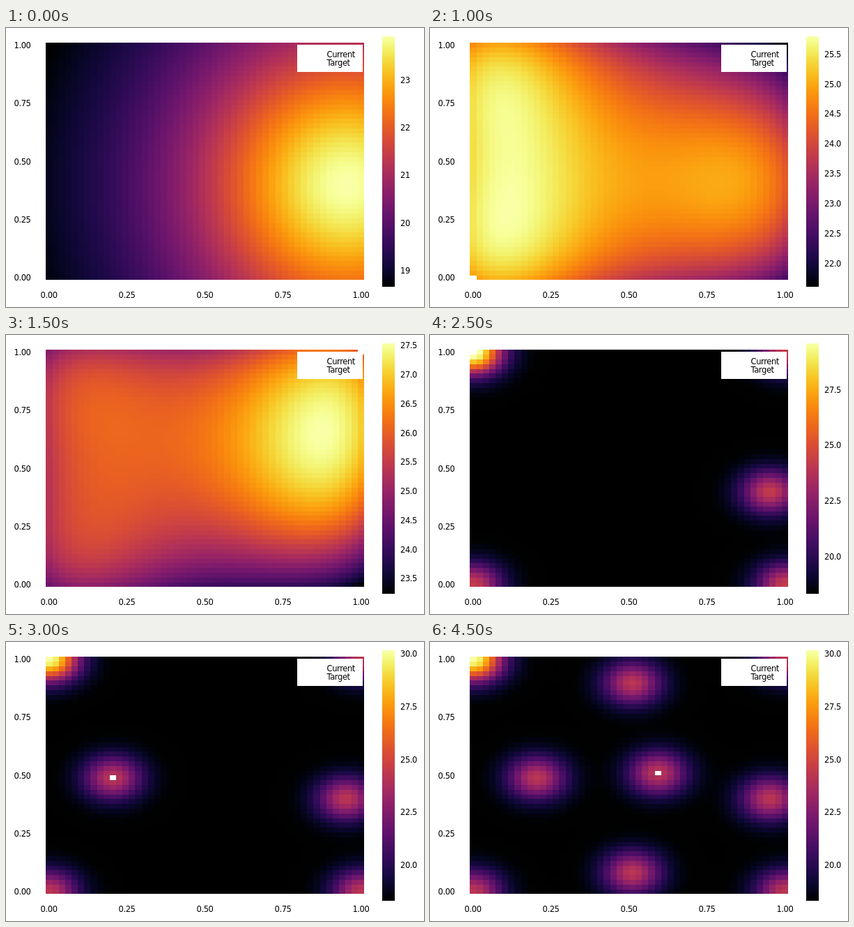
These frames come from a looping animation (600 px wide and 400 px high, 5 s). An HTML page with a canvas:

```html
<!DOCTYPE html>
<html lang="en">
<head>
<meta charset="utf-8">
<style>
  html, body { margin: 0; width: 100%; height: 100%; overflow: hidden; background: #fff; }
  canvas { display: block; }
</style>
</head>
<body>
<canvas id="stage" width="600" height="400"></canvas>
<script>
const ctx = document.getElementById('stage').getContext('2d');
const N = 50, LAST = N - 1, STEP_MS = 500;
const plot = { x: 57, y: 21, w: 457, h: 340 };
const bar = { x: 540, y: 12, w: 18, h: 359 };

// Polynomial fit of the inferno colour map, lowest power first.
const INFERNO = [
  [0.0002, 0.1065, 11.6025, -41.7040, 77.1629, -71.3194, 25.1311],
  [0.0017, 0.5640, -3.9729, 17.4364, -33.4024, 32.6261, -12.2427],
  [-0.0195, 3.9327, -15.9424, 44.3541, -81.8073, 73.2095, -23.0703]
];
function inferno(v) {
  const rgb = INFERNO.map(c => {
    const level = c.reduceRight((sum, k) => sum * v + k, 0);
    return Math.round(255 * Math.min(1, Math.max(0, level)));
  });
  return `rgb(${rgb})`;
}

// Sampled places in grid cells, counted from the bottom left; one is added per step.
const samples = [
  [46.6, 19.6], [0, LAST], [0, 0], [LAST, LAST], [LAST, 0],
  [0, LAST], [10, 24], [25, 44], [25, 4], [29, 25]
];
// Value ranges of the first, widely blurred steps; later ones follow from the samples.
const wideRanges = [[18.66, 23.92], [19.61, 24.37], [21.61, 25.8], [23.24, 27.54], [25.25, 28.94]];
const BASE = 18.32, GAIN = 5.925;

const aspect = plot.h / plot.w;
const wideHill = (dx, dy) => 1 / (1 + (dx ** 2 + (dy * aspect) ** 2) / 0.3);
const narrowHill = (dx, dy) => Math.exp(-(dx ** 2 + dy ** 2) / (2 * 0.065 ** 2));

// Wide surfaces sink a little towards the four edges.
const rim = (x, y) => [x, 1 - x, y, 1 - y].reduce((sum, t) => sum + Math.exp(-t / 0.1), 0);

function makeScene(last, index) {
  const known = samples.slice(0, index + 1);
  const range = wideRanges[index];
  const hill = range ? wideHill : narrowHill;
  const rimDepth = range ? 0.1 * (1 - 1 / known.length) : 0;

  const cells = [];
  for (let row = 0; row < N; row++) {
    for (let col = 0; col < N; col++) {
      if (col === last[0] && row === last[1]) continue;
      const v = known.reduce((sum, [cx, cy]) => sum + hill((col - cx) / LAST, (row - cy) / LAST), 0);
      cells.push({ col, row, v: v - rimDepth * rim(col / LAST, row / LAST) });
    }
  }
  const values = cells.map(c => c.v);
  const min = Math.min(...values), max = Math.max(...values);
  for (const c of cells) c.color = inferno((c.v - min) / (max - min));

  const [lo, hi] = range || [BASE, BASE + GAIN * max];
  return { cells, lo, hi };
}
const scenes = samples.map(makeScene);

function label(text, x, y, align) {
  ctx.fillStyle = '#000';
  ctx.textAlign = align;
  ctx.fillText(text, x, y + 4);
}

function drawHeat(cells) {
  const edgeX = i => Math.ceil(plot.x + i * plot.w / N);
  const edgeY = i => Math.ceil(plot.y + i * plot.h / N);
  for (const { col, row, color } of cells) {
    const x = edgeX(col), top = LAST - row, y = edgeY(top);
    ctx.fillStyle = color;
    ctx.fillRect(x, y, edgeX(col + 1) - x, edgeY(top + 1) - y);
  }
}

function drawAxes() {
  const padX = plot.w / N / 2, padY = plot.h / N / 2;
  for (let i = 0; i <= 4; i++) {
    const text = (i / 4).toFixed(2);
    label(text, plot.x + padX + i / 4 * (plot.w - 2 * padX), 383, 'center');
    label(text, 35.5, plot.y + plot.h - padY + 0.5 - i / 4 * (plot.h - 2 * padY), 'right');
  }
}

function drawLegend() {
  ctx.fillStyle = '#fff';
  ctx.fillRect(418, 24, 94, 39);
  label('Current', 460.5, 37.5, 'left');
  label('Target', 460.5, 50, 'left');
}

function drawColorBar({ lo, hi }) {
  for (let i = 0; i < bar.h; i++) {
    ctx.fillStyle = inferno(1 - i / (bar.h - 1));
    ctx.fillRect(bar.x, bar.y + i, bar.w, 1);
  }
  const span = hi - lo;
  const tick = span > 8 ? 2.5 : span > 5 ? 1 : 0.5;
  for (let v = Math.ceil(lo / tick) * tick; v <= hi; v += tick) {
    label(v.toFixed(tick === 1 ? 0 : 1), 566, bar.y + bar.h * (hi - v) / span, 'left');
  }
}

let shown = -1;
function frame() {
  const index = Math.floor(performance.now() / STEP_MS) % scenes.length;
  if (index !== shown) {
    shown = index;
    ctx.fillStyle = '#fff';
    ctx.fillRect(0, 0, 600, 400);
    ctx.font = '11.5px "DejaVu Sans", sans-serif';
    ctx.letterSpacing = '-0.4px';
    drawHeat(scenes[index].cells);
    drawAxes();
    drawLegend();
    drawColorBar(scenes[index]);
  }
  requestAnimationFrame(frame);
}
frame();
</script>
</body>
</html>
```
